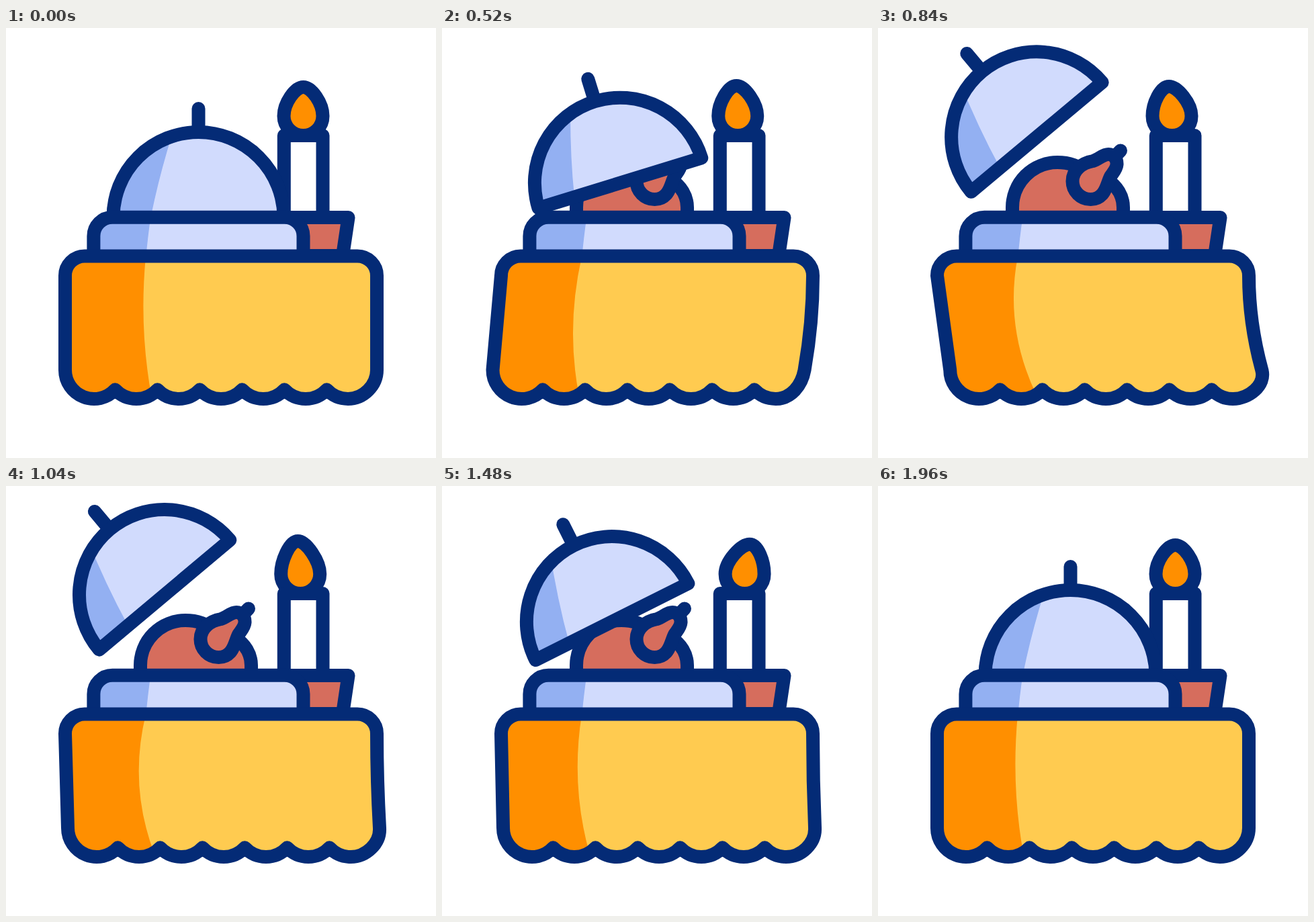
Animation, 640 px wide and 640 px high, one loop 2360 ms. Source, as an HTML page:

```html
<!DOCTYPE html>
<html lang="en">
<head>
<meta charset="utf-8">
<title>Dinner is served</title>
<style>
  html, body { margin: 0; width: 100%; height: 100%; overflow: hidden; background: #fff; }
  svg { display: block; width: 100%; height: 100%; }
  .line { fill: none; stroke: #042b76; stroke-width: 20; stroke-linecap: round; stroke-linejoin: round; }
  .meat { fill: #d66d5d; }
  .steel { fill: #d1dbfd; }
  .shade { fill: #93b0f2; }
  .wax { fill: #fff; }
  .flame { fill: #ff8f00; }
</style>
</head>
<body>
<svg viewBox="0 0 640 640">
  <defs>
    <path id="bell" d="M-127 0A127 127 0 0 1 127 0Z"/>
    <path id="tray" d="M130.400 340V310A28 28 0 0 1 158.400 281.800H414.500A28 28 0 0 1 442.500 310V340Z"/>
    <path id="cloth"/>
    <clipPath id="bellClip"><use href="#bell"/></clipPath>
    <clipPath id="trayClip"><use href="#tray"/></clipPath>
    <clipPath id="clothClip"><use href="#cloth"/></clipPath>
  </defs>

  <path id="flame" class="line flame"/>
  <path class="line wax" d="M413.800 282V160H471.500V282Z"/>
  <path class="line meat" d="M414 282H509.500L501 339H414Z"/>

  <g id="chicken">
    <path class="line meat" d="M200 282V267A67 67 0 0 1 267 200C285 200 300 206 310 215L340 225C356 235 365 250 365 267V282Z"/>
    <path class="line" d="M350 194L361 182.500"/>
    <path class="line meat" d="M343 188C335 188 329 195 320 198C303 201 289.500 212 289.500 228A27 27 0 0 0 316.500 255C339 255 341 230 346 221C350 215 355 210 355.500 203C356 194 350 188 343 188Z"/>
  </g>

  <g id="dome">
    <path class="line" d="M0 -162V-127"/>
    <use href="#bell" class="steel"/>
    <path class="shade" clip-path="url(#bellClip)" d="M-140 -140H-34Q-58 -66 -71 0H-140Z"/>
    <use href="#bell" class="line"/>
  </g>

  <use href="#tray" class="steel"/>
  <path class="shade" clip-path="url(#trayClip)" d="M120 270H217Q211 310 208.500 340H120Z"/>
  <use href="#tray" class="line"/>

  <use href="#cloth" fill="#ffcb50"/>
  <path id="clothShade" fill="#ff8f00" clip-path="url(#clothClip)"/>
  <use href="#cloth" class="line"/>
</svg>
<script>
const LOOP = 2360, STEP = 40;

// Key points are [time, value] pairs, eased between neighbours.
const swing = [[315, 0], [625, -17], [860, 20], [1220, -12], [1580, 6.5], [1840, 0]];
const lean = [[160, 0], [960, -10], [1440, 15.5], [1960, 0]];
const flicker = [0, -2.6, 0.6, -6, 2.6, -6, 0].map((y, i) => [140 + 300 * i, y]);
// The middle of the cloth bows inwards on each swing to the left.
const bow = swing.map(([t, dx]) => [t, dx < 0 ? -13.5 : 0]);

const get = id => document.getElementById(id);
const setPath = (id, d) => get(id).setAttribute('d', d);

function ease(t, from, to) {
  const x = Math.min(1, Math.max(0, (t - from) / (to - from)));
  return x * x * (3 - 2 * x);
}

function follow(keys, t) {
  let value = keys[0][1];
  for (let i = 1; i < keys.length; i++) {
    const [from, a] = keys[i - 1], [to, b] = keys[i];
    value += (b - a) * ease(t, from, to);
  }
  return value;
}

function clothPath(dx) {
  const scallop = (x, y) => `A43 43 0 0 0 ${x + dx} ${y}`;
  let d = `M117 339.5A29 29 0 0 0 88 368.5L${88 + dx} 509`;
  for (let i = 0; i < 6; i++) d += scallop(162.5 + 63 * i, 538.3);
  d += scallop(509, 552);
  d += `C${532 + dx} 552 ${552 + 1.33 * dx} 532 ${552 + dx} 509`;
  d += `C${552 + 0.45 * dx} 470 552 420 552 368.5`;
  return d + 'A29 29 0 0 0 523 339.5Z';
}

function shadePath(dx, mid) {
  return `M40 330H208V340Q${198 + 2 * mid - dx / 2} 445 ${216 + dx} 545V580H40Z`;
}

function flamePath(tx, ty) {
  const x = 442.5 + tx, y = 88 + ty, c = 442.5 + tx * 0.53;
  const l = c - 29, r = c + 29;
  return `M${x} ${y}C${x + 12.5} ${y} ${r} 112 ${r} 131A29 29 0 0 1 ${l} 131C${l} 112 ${x - 12.5} ${y} ${x} ${y}Z`;
}

function draw(t) {
  const lift = ease(t, 240, 860) - ease(t, 1280, 1796);
  const dx = follow(swing, t);
  get('dome').setAttribute('transform',
    `translate(${286.5 - 50.5 * lift} ${282 - 120 * lift}) rotate(${-40 * lift})`);
  setPath('cloth', clothPath(dx));
  setPath('clothShade', shadePath(dx, follow(bow, t)));
  setPath('flame', flamePath(follow(lean, t), follow(flicker, t)));
}

function tick() {
  draw(Math.floor(performance.now() % LOOP / STEP) * STEP);
  requestAnimationFrame(tick);
}
tick();
</script>
</body>
</html>
```
